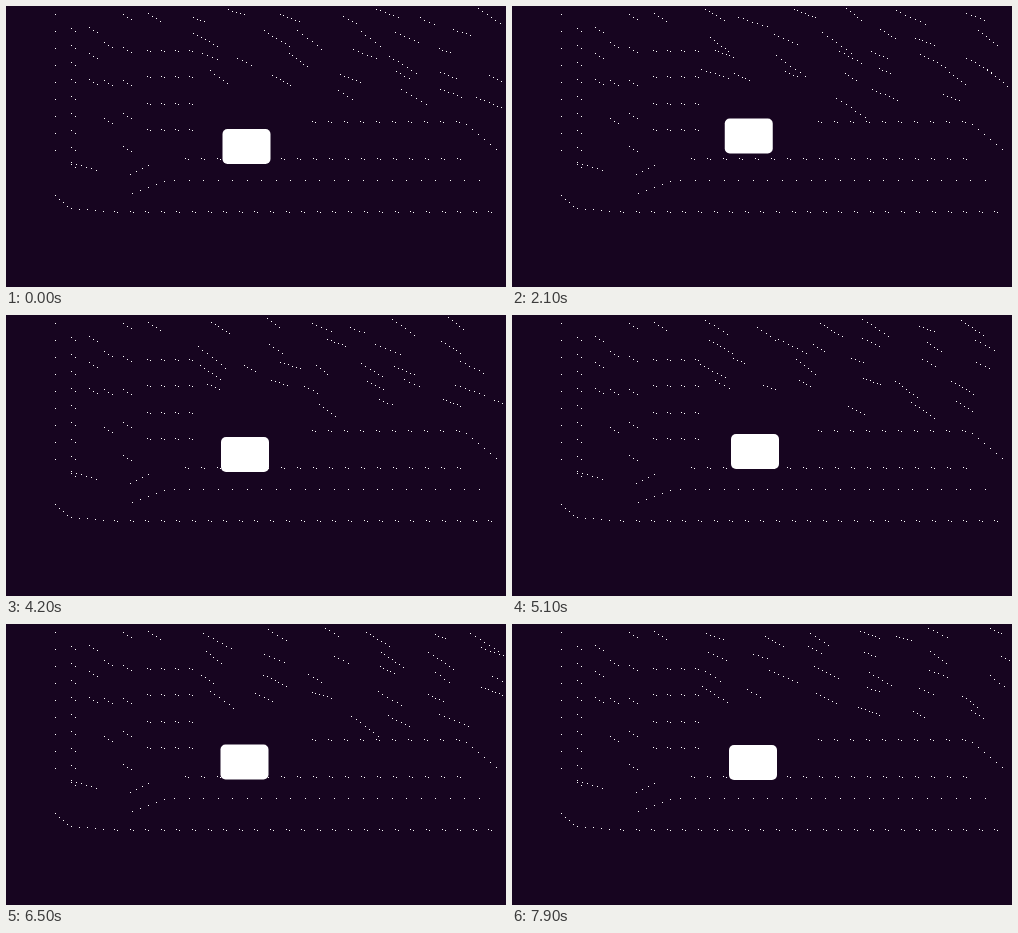
These frames come from a looping animation (500x281 px, 8 s). An HTML page with a canvas:

```html
<!DOCTYPE html>
<html lang="en">
<head>
<meta charset="utf-8">
<title>Floating block</title>
<style>
  html, body { margin: 0; width: 100%; height: 100%; overflow: hidden; background: #170520; }
  canvas { display: block; }
</style>
</head>
<body>
<canvas id="stage" width="500" height="281"></canvas>
<script>
const ctx = document.getElementById('stage').getContext('2d');
const LOOP = 8000, STEP = 100;

// key points of the drift: time, left, top
const keys = [
  [0, 216.5, 123], [1300, 212.5, 117], [2900, 213, 108], [4200, 215, 122],
  [5100, 219, 119], [6500, 214.5, 120.5], [7900, 217, 121]
];

function random(seed) {
  let s = seed * 7919 + 17;
  return () => {
    s = (s + 0x6D2B79F5) | 0;
    let v = Math.imul(s ^ (s >>> 15), s | 1);
    v ^= v + Math.imul(v ^ (v >>> 7), v | 61);
    return ((v ^ (v >>> 14)) >>> 0) / 4294967296;
  };
}

function speck(x, y) {
  if (x < 498) ctx.fillRect(Math.round(x), Math.round(y), 1, 1);
}

function streak(x, y, dx, dy, count) {
  for (let i = 0; i < count; i++) speck(x + i * dx, y + i * dy);
}

// a column of short falling streaks
function column(x, from, to, pitch, count) {
  for (let y = from; y <= to; y += pitch) streak(x, y, 4, 2.5, count);
}

// a row of evenly spaced pairs, the second speck slightly lower
function row(from, to, y, pitch) {
  for (let x = from; x <= to; x += pitch) {
    speck(x, y);
    speck(x + 3, y + 1);
  }
}

function fixedSpecks() {
  column(49, 8, 160, 17, 1);
  column(65, 22, 160, 17, 2);
  column(83, 21, 80, 26, 3);
  column(98, 36, 125, 38, 3);
  column(117, 8, 145, 33, 3);
  column(142, 7, 20, 30, 4);
  for (let y = 44; y < 130; y += 26.3) row(141, 196, y, 14);

  // outline of the floor
  streak(49, 189, 4, 3.5, 4);
  streak(65, 202, 8, 0.7, 5);
  row(108, 486, 205, 15.6);
  streak(65, 156, 5, 1.6, 6);
  streak(124, 168, 6, -3, 4);
  streak(126, 187, 8, -3, 5);
  streak(168, 174, 14.5, 0, 22);
  row(179, 460, 152, 16);
  row(306, 458, 115, 16);
  streak(460, 118, 6, 5, 6);
}

// falling streaks that regroup at every step
function shiftingSpecks(step) {
  const rnd = random(step + 1);
  for (let band = 0; band < 5; band++) {
    for (let x = 186 + rnd() * 20; x < 490; x += 32 + rnd() * 40) {
      const y = 2 + band * 20 + rnd() * 10;
      const dx = 3.5 + rnd() * 1.5, slope = 0.3 + rnd() * 0.5;
      const count = 4 + Math.floor(rnd() * 4);
      const besideBlock = band > 3 && x < 300;
      if (!besideBlock) streak(x, y, dx, dx * slope, count);
    }
  }
}

// eased drift between key points with a quicker bob on top
function blockAt(t) {
  const next = Math.max(1, keys.findIndex(k => k[0] >= t));
  const [t0, x0, y0] = keys[next - 1], [t1, x1, y1] = keys[next];
  const p = (t - t0) / (t1 - t0);
  const ease = (1 - Math.cos(Math.PI * p)) / 2;
  return [
    x0 + (x1 - x0) * ease + 2 * Math.sin(2 * Math.PI * p),
    y0 + (y1 - y0) * ease + 5 * Math.sin(4 * Math.PI * p)
  ];
}

function draw() {
  const step = Math.floor((performance.now() % LOOP) / STEP);
  ctx.fillStyle = '#170520';
  ctx.fillRect(0, 0, 500, 281);
  ctx.fillStyle = '#fff';
  fixedSpecks();
  shiftingSpecks(step);
  ctx.beginPath();
  ctx.roundRect(...blockAt(step * STEP), 48, 35, 5);
  ctx.fill();
  requestAnimationFrame(draw);
}
draw();
</script>
</body>
</html>
```
